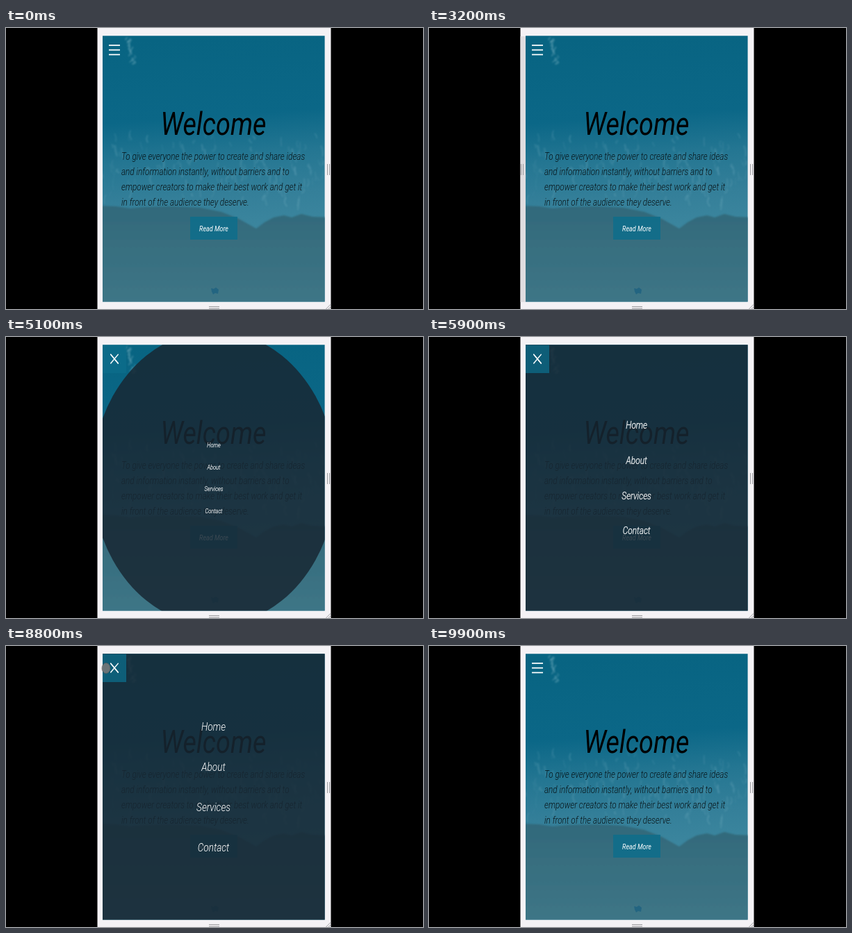
Recreate the animation shown at these times as an HTML page. Size 600 px wide and 405 px high, loop 10 s.

```html
<!DOCTYPE html>
<html lang="en">
<head>
<meta charset="utf-8">
<title>Overlay menu</title>
<style>
  html, body { margin: 0; width: 100%; height: 100%; overflow: hidden; background: #000; }
  svg { display: block; width: 600px; height: 405px; }
  text { font: italic 300 11.75px Roboto, sans-serif; }
  .title { font-size: 37.8px; font-weight: 400; }
  .body { fill-opacity: .85; }
  .item { font-size: 13.6px; }
  .more { font-size: 9px; font-weight: 400; }
  .item, .more { fill: #fff; text-anchor: middle; }
  .grip { stroke: #9c9c9f; fill: none; }
</style>
</head>
<body>
<svg viewBox="0 0 600 405">
  <defs>
    <linearGradient id="sea" gradientUnits="userSpaceOnUse" x1="0" y1="11" x2="0" y2="300" gradientTransform="rotate(-4 300 150)">
      <stop offset="0" stop-color="#086482"/>
      <stop offset=".4" stop-color="#0b6787"/>
      <stop offset=".6" stop-color="#247692"/>
      <stop offset=".8" stop-color="#347f99"/>
      <stop offset="1" stop-color="#3d879f"/>
    </linearGradient>
    <linearGradient id="sand" x2="0" y2="1">
      <stop offset="0" stop-color="#31697b"/>
      <stop offset=".35" stop-color="#376e7f"/>
      <stop offset="1" stop-color="#3e7687"/>
    </linearGradient>
    <clipPath id="page"><rect x="139" y="11.300" width="319.600" height="383.200"/></clipPath>
    <filter id="soft"><feGaussianBlur stdDeviation=".8"/></filter>
  </defs>

  <rect width="600" height="405"/>
  <rect x="131.500" width="336" height="405" fill="#f4f2f5"/>
  <g id="leftBar">
    <rect x="131.500" y="12" width="7.500" height="383" fill="#dfdde0"/>
    <path class="grip" d="M132.500 196v16m3-16v16"/>
  </g>
  <path class="grip" d="M462.500 196v16m3-16v16M292 401.500h15m-15 2.500h15M460.500 405l7-7m-3.500 7l3.500-3.500"/>

  <g clip-path="url(#page)">
    <rect x="139" y="11" width="320" height="385" fill="url(#sea)"/>
    <g id="foam" stroke="#7db4c4" fill="none" stroke-linecap="round" filter="url(#soft)"/>
    <path fill="url(#sand)" filter="url(#soft)"
      d="M130 256l28 1 20 3 22-2 40-1 40 2 30 6 25 10 25 14 12-9 13-7 15-3 11 3 14-5 16 4 28 1v130H130z"/>
    <path fill="#195f80" opacity=".7" d="M295 375l4 1 3-2 4 3-1 6-4-1-3 2-2-4z"/>
    <rect x="265" y="272" width="68" height="33" fill="#0d6e8b" fill-opacity=".85"/>
    <g id="copy"/>
    <g id="menu"><ellipse rx="320" ry="387" fill="rgb(24,39,51)" fill-opacity=".85"/></g>
    <rect x="139" y="11.500" width="34" height="40.500" fill="#0d6e8b" fill-opacity=".75" id="toggle"/>
    <g transform="translate(156 31.600) scale(1 1.205)" stroke="#fff" stroke-width="1.3">
      <g id="burger"><path d="M-8 0H8"/><path d="M-8 0H8"/><path d="M-8 0H8"/></g>
    </g>
  </g>
  <ellipse id="cursor" rx="6" ry="7.500" fill="#777" fill-opacity=".88" stroke="#555" stroke-opacity=".6"/>
</svg>
<script>
const $ = id => document.getElementById(id);
const STRETCH = 1.205;   // the whole page is taller than wide by this factor
const LOOP = 10000, OPEN = 4145, CLOSE = 8960;

function add(parent, tag, attrs, text = '') {
  const node = document.createElementNS('http://www.w3.org/2000/svg', tag);
  for (const key in attrs) node.setAttribute(key, attrs[key]);
  node.textContent = text;
  parent.append(node);
}
const write = (parent, cls, x, y, text) =>
  add(parent, 'text', { class: cls, transform: `translate(${x} ${y}) scale(1 ${STRETCH})` }, text);

write($('copy'), 'title', 222.5, 153.6, 'Welcome');
['To give everyone the power to create and share ideas',
 'and information instantly, without barriers and to',
 'empower creators to make their best work and get it',
 'in front of the audience they deserve.'
].forEach((line, i) => write($('copy'), 'body', 166, 189.6 + i * 22.2, line));
write($('copy'), 'more', 299, 293, 'Read More');
['Home', 'About', 'Services', 'Contact']
  .forEach((name, i) => write($('menu'), 'item', -1, -81 + i * 57.8, name));

// Sea foam: streaks along the shore and one small patch at the top
let seed = 7;
const random = () => (seed = seed * 16807 % 2147483647) / 2147483647;
function streak(x, y, length, opacity) {
  add($('foam'), 'path', {
    d: `M${x} ${y}q${random() * 8 - 4} ${length / 2} ${random() * 6 - 3} ${length}`,
    'stroke-opacity': opacity, 'stroke-width': 1 + random() * 2
  });
}
for (let i = 0; i < 160; i++)
  streak(139 + random() * 320, 145 + (random() + random()) * 55, 3 + random() * 12, .05 + random() * .2);
for (let i = 0; i < 16; i++)
  streak(173 + i / 2 + random() * 7, 14 + i * 2.3, 3, .4);

// CSS "ease": cubic-bezier(.25, .1, .25, 1)
function ease(p) {
  if (p <= 0) return 0;
  if (p >= 1) return 1;
  const bezier = (a, b, u) => 3 * a * u * (1 - u) ** 2 + 3 * b * u * u * (1 - u) + u ** 3;
  let low = 0, high = 1;
  for (let i = 0; i < 24; i++) {
    const mid = (low + high) / 2;
    if (bezier(.25, .25, mid) < p) low = mid; else high = mid;
  }
  return bezier(.1, 1, low);
}

// Pointer visits as [time, x, y]
const visits = [
  [[3300, 140, 48], [3600, 155, 32], [4000, 155, 32], [4300, 158, 12]],
  [[8300, 140, 42], [8600, 155, 32], [8700, 155, 32], [8800, 144, 32], [9000, 144, 32], [9300, 146, 16]]
];
function pointerAt(t) {
  const path = visits.find(v => t >= v[0][0] && t < v[v.length - 1][0]);
  if (!path) return null;
  const i = path.findIndex(point => point[0] > t);
  const [t0, x0, y0] = path[i - 1], [t1, x1, y1] = path[i];
  const p = (t - t0) / (t1 - t0);
  return [x0 + (x1 - x0) * p, y0 + (y1 - y0) * p];
}

const between = (t, a, b) => t >= a && t < b;
const show = (id, on) => $(id).style.display = on ? '' : 'none';

function draw(t) {
  const closing = t >= CLOSE;
  const scale = closing ? 1 - ease((t - CLOSE) / 400) : ease((t - OPEN) / 3000);
  const cross = closing ? scale : ease((t - OPEN + 100) / 400);

  show('menu', scale > 0);
  $('menu').setAttribute('transform', `translate(299.500 203.300) scale(${scale})`);
  // Scaled text is soft and heavier until the layer settles
  $('menu').style.stroke = between(t, 7400, CLOSE) ? 'none' : 'rgba(255,255,255,.5)';
  $('menu').firstChild.style.stroke = 'none';
  $('menu').style.strokeWidth = .5;
  show('toggle', scale > 0);

  $('burger').setAttribute('transform', `rotate(${135 * cross})`);
  [...$('burger').children].forEach((bar, i) => bar.setAttribute('transform',
    `translate(0 ${(i - 1) * 5.6 * (1 - cross)}) rotate(${i === 1 ? 0 : 90 * cross})`));

  show('leftBar', between(t, 3000, 3400) || between(t, 8000, 8300));
  const pointer = pointerAt(t);
  show('cursor', pointer);
  if (pointer) $('cursor').setAttribute('transform', `translate(${pointer})`);
}

function tick() {
  draw(Math.floor(performance.now() % LOOP / 100) * 100);   // ten pictures a second
  requestAnimationFrame(tick);
}
tick();
</script>
</body>
</html>
```
